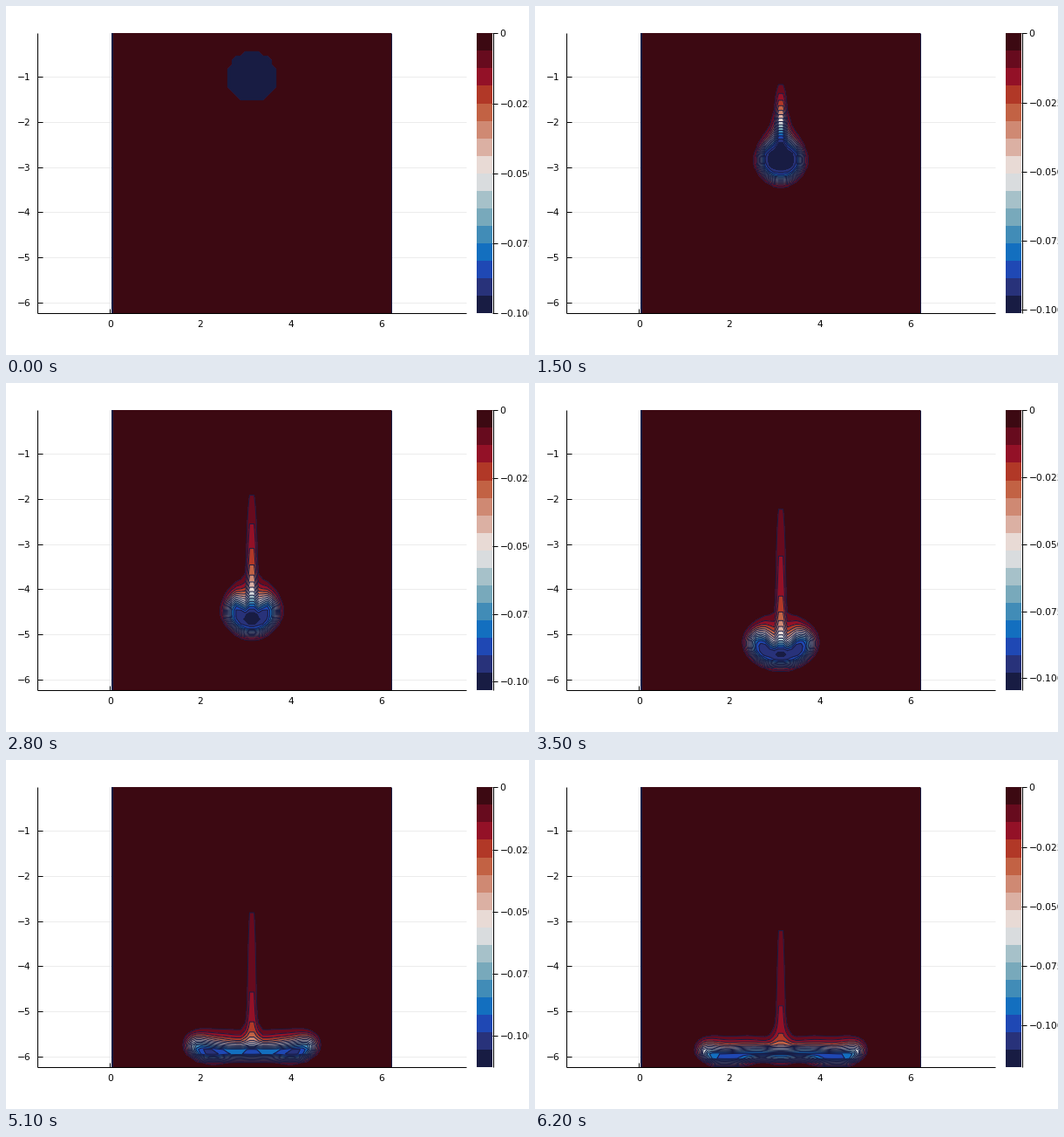
Write a matplotlib script that moves like this. It is 600 px wide and 400 px high and loops after 6.25 s.

```python
import numpy as np
import matplotlib.pyplot as plt
from matplotlib.animation import FuncAnimation
from matplotlib.patches import Rectangle

plt.rcParams["font.family"] = "DejaVu Sans"

W, H, DPI = 600, 400, 100
FRAMES, INTERVAL, SUBSTEPS = 125, 50, 5
N = 64
CELL = 2 * np.pi / N
PX = 72 / DPI
SCALE = 51.83
LEFT, RIGHT, TOP, BOTTOM = 36, 528, 31.3, 352.2
NAVY = "#181c43"
BANDS = ["#3c0912", "#670b1e", "#931127", "#b13827", "#c26244", "#cf8973",
         "#dbb0a3", "#e8dad5", "#d9dcde", "#a6c1c9", "#78a9bb", "#418cb7",
         "#136fbf", "#1f48b4", "#28327a", NAVY]

# Keys: frame, depth of the blob's centre of mass, sinking speed, colour range
KEYS = np.array([
    [0, 1.00, .045, .1000],
    [18, 1.95, .062, .1006],
    [41, 3.40, .065, .1017],
    [70, 5.10, .042, .1045],
    [89, 5.55, .015, .1073],
    [102, 5.69, .0085, .1126],
    [124, 5.80, .003, .1176],
])


def to_x(x):
    return 119.2 + SCALE * x


def to_y(y):
    return 29.1 - SCALE * y


def depth(t):
    """Cubic Hermite path of the centre of mass."""
    i = min(np.searchsorted(KEYS[:, 0], t, side="right") - 1, len(KEYS) - 2)
    (t0, d0, v0, _), (t1, d1, v1, _) = KEYS[i], KEYS[i + 1]
    span = t1 - t0
    s = (t - t0) / span
    return ((1 + 2 * s) * (1 - s) ** 2 * d0 + s * (1 - s) ** 2 * span * v0
            + s * s * (3 - 2 * s) * d1 + s * s * (s - 1) * span * v1)


# Stokes flow: biharmonic stream function, sine modes in x, no-slip floor and lid
modes = np.arange(1, N)
SINE = np.sin(np.pi * np.outer(modes, modes) / N)
D2 = -2 * np.eye(N - 1) + np.eye(N - 1, k=1) + np.eye(N - 1, k=-1)
lap = D2 - (2 - 2 * np.cos(np.pi * modes / N))[:, None, None] * np.eye(N - 1)
biharm = lap @ lap
biharm[:, 0, 0] += 2
biharm[:, -1, -1] += 2
SOLVE = np.linalg.inv(biharm)


def velocity(c):
    gx = (c[1:, 1:] + c[:-1, 1:] - c[1:, :-1] - c[:-1, :-1]) / 2
    psi = np.pad(np.einsum("kij,jk->ik", SOLVE, gx @ SINE) @ SINE * 2 / N, 1)
    return -np.diff(psi, axis=0), np.diff(psi, axis=1)


def flux(c, v):
    """Upwind flux through the faces along the last axis, van Leer limited."""
    p = np.pad(c, ((0, 0), (2, 2)), mode="edge")
    d = np.diff(p)
    a, b = d[:, :-1], d[:, 1:]
    ab = a * b
    slope = np.where(ab > 0, 2 * ab / np.where(ab > 0, a + b, 1), 0)
    mid = p[:, 1:-1]
    up = mid[:, :-1] + slope[:, :-1] / 2
    down = mid[:, 1:] - slope[:, 1:] / 2
    return np.where(v > 0, up, down) * v


def rate(c, u, w):
    return -np.diff(flux(c, u)) - np.diff(flux(c.T, w.T)).T


centres = (np.arange(N) + .5) * CELL
xs, ys = centres, centres - 2 * np.pi


def simulate():
    c = ((xs - np.pi) ** 2 + (ys[:, None] + 1) ** 2 < .25).astype(float)
    fields = [c]
    for step in range(1, (FRAMES - 1) * SUBSTEPS + 1):
        u, w = velocity(c)
        mass = c.sum()
        now = -(c * ys[:, None]).sum() / mass
        mean = -(c * (w[1:] + w[:-1]) / 2).sum() / mass
        gain = max(depth(step / SUBSTEPS) - now, 0) / CELL / mean
        u, w = u * gain, w * gain
        c1 = c + rate(c, u, w)
        c = (c + c1 + rate(c1, u, w)) / 2
        if step % SUBSTEPS == 0:
            fields.append(c)
    return fields


fields = simulate()

fig = plt.figure(figsize=(W / DPI, H / DPI), dpi=DPI, facecolor="white")
ax = fig.add_axes([0, 0, 1, 1])
ax.set(xlim=(0, W), ylim=(H, 0))
ax.axis("off")


def line(x, y, color="black", width=1.0, z=1):
    ax.plot(x, y, color=color, lw=width * PX, solid_capstyle="butt", zorder=z)


def label(x, y, text, ha):
    return ax.text(x, y, text, ha=ha, va="center_baseline",
                   fontsize=10.67 * PX, color="black", zorder=6)


def box(x0, y0, x1, y1, color, z):
    ax.add_patch(Rectangle((x0, y0), x1 - x0, y1 - y0, fc=color, lw=0, zorder=z))


for v in range(1, 7):
    y = to_y(-v)
    line((LEFT, RIGHT), (y, y), "#ececec")
    line((LEFT, LEFT + 6), (y, y), z=2)
    label(28.5, y, f"\u2212{v}", "right")
for v in (0, 2, 4, 6):
    x = to_x(v)
    line((x, x), (TOP, BOTTOM), "#ececec")
    line((x, x), (BOTTOM - 5, BOTTOM), z=2)
    label(x, 363.5, str(v), "center")

x0, x1 = to_x(xs[0]), to_x(xs[-1])
box(x0, TOP, x1, BOTTOM, BANDS[0], 3)
line((122.3, 122.3), (TOP, BOTTOM), NAVY, 2, 5)
line((x1, x1), (TOP, BOTTOM), NAVY, 1, 5)
line((LEFT, LEFT), (TOP, BOTTOM), z=6)
line((LEFT, RIGHT), (BOTTOM, BOTTOM), z=6)

# Colour bar
BAR_X0, BAR_X1 = 540, 558
edges = np.linspace(TOP, BOTTOM, len(BANDS) + 1)
for color, a, b in zip(BANDS, edges, edges[1:]):
    box(BAR_X0, a, BAR_X1, b, color, 3)
line((BAR_X1 + .5, BAR_X1 + .5), (TOP, BOTTOM), z=6)
TICKS = np.arange(5) * .025
bar_labels = [label(566.5, TOP, f"\u2212{v:.3f}" if v else "0", "left")
              for v in TICKS]
bar_ticks = ax.hlines([TOP] * 5, BAR_X1, BAR_X1 + 6, color="black", lw=PX, zorder=6)

shown = []


def draw(i):
    while shown:
        shown.pop().remove()
    top = np.interp(i, KEYS[:, 0], KEYS[:, 3])

    tick_y = TOP + (BOTTOM - TOP) * TICKS / top
    for text, y in zip(bar_labels, tick_y):
        text.set_y(y)
    bar_ticks.set_segments([[(BAR_X1, y), (BAR_X1 + 6, y)] for y in tick_y])

    c = fields[i]
    z = .1 * c / c.max()
    levels = np.linspace(0, top, len(BANDS) + 1)[1:-1]
    grid = to_x(xs), to_y(ys), z
    shown.append(ax.contourf(*grid, levels=[*levels, 1], colors=BANDS[1:], zorder=4))
    shown.append(ax.contour(*grid, levels=levels, colors=NAVY,
                            linewidths=PX, zorder=4.5))
    ax.set(xlim=(0, W), ylim=(H, 0))
    return []


anim = FuncAnimation(fig, draw, frames=FRAMES, interval=INTERVAL,
                     repeat=True, repeat_delay=0, blit=False)
plt.show()
```
